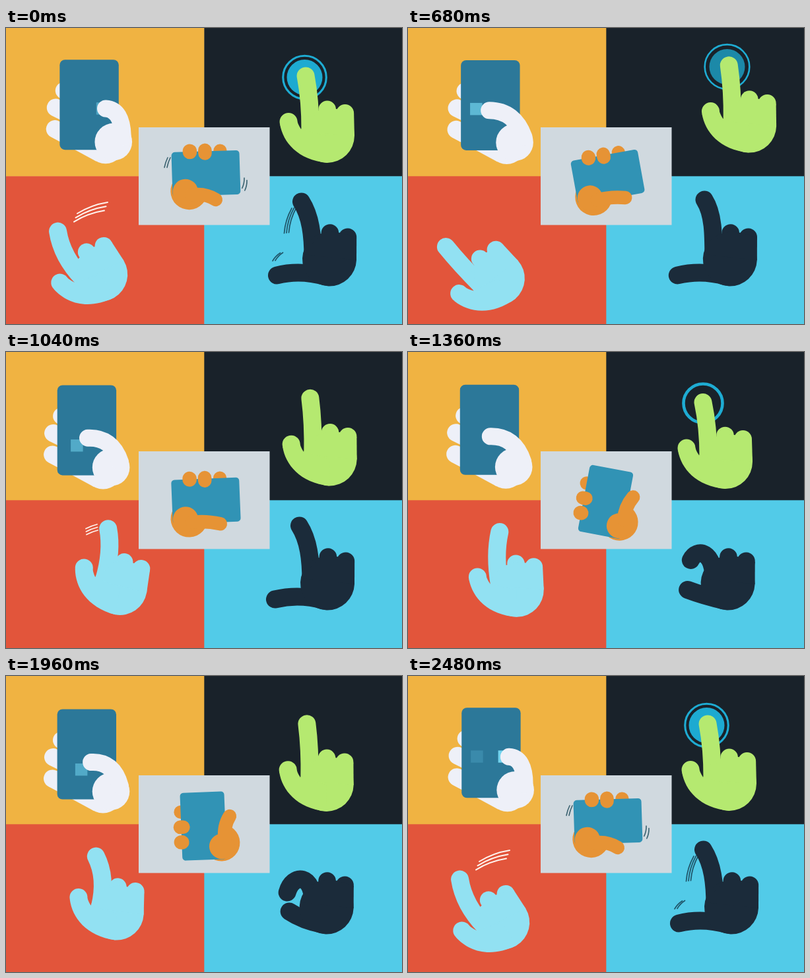
Write an HTML page with a canvas that moves like this. It is 600 by 450 pixels and loops after 2.52 s.

```html
<!DOCTYPE html>
<html lang="en">
<head>
<meta charset="utf-8">
<title>Touch gestures</title>
<style>
  html, body { margin: 0; width: 100%; height: 100%; overflow: hidden; }
  canvas { display: block; width: 600px; height: 450px; }
</style>
</head>
<body>
<canvas id="stage" width="600" height="450"></canvas>
<script>
const ctx = document.getElementById('stage').getContext('2d');
const LOOP = 2520;
const CYCLE = 2480; // the rest of the loop holds the first pose
const SWIPE = 840;

const taps = [
  { time: 520, x: 483.5, y: 59 },
  { time: 1360, x: 447, y: 78 },
  { time: 2360, x: 452.5, y: 75 }
];

const clamp = v => Math.max(0, Math.min(1, v));
const mix = (a, b, k) => a + (b - a) * k;
const rad = deg => deg * Math.PI / 180;
const since = (start, t) => (t - start + CYCLE) % CYCLE;

// Eased step from 0 to 1 between two times.
function ramp(t, from, to) {
  const u = clamp((t - from) / (to - from));
  return u * u * (3 - 2 * u);
}

function paint(color) {
  ctx.fillStyle = ctx.strokeStyle = color;
}

function disc(x, y, r) {
  ctx.beginPath();
  ctx.arc(x, y, r, 0, 2 * Math.PI);
  ctx.fill();
}

function box(x, y, w, h, r) {
  ctx.beginPath();
  ctx.roundRect(x, y, w, h, r);
  ctx.fill();
}

function poly(...pts) {
  ctx.beginPath();
  pts.forEach(p => ctx.lineTo(...p));
  ctx.fill();
}

function limb(width, x, y, ...curve) {
  ctx.lineWidth = width;
  ctx.beginPath();
  ctx.moveTo(x, y);
  if (curve.length === 2) ctx.lineTo(...curve);
  else if (curve.length === 4) ctx.quadraticCurveTo(...curve);
  else ctx.bezierCurveTo(...curve);
  ctx.stroke();
}

// Draws in a moved and turned space.
function within(x, y, turn, body) {
  ctx.save();
  ctx.translate(x, y);
  ctx.rotate(rad(turn));
  body();
  ctx.restore();
}

// Parallel arcs that shoot out, rest and shrink back to their heads.
function speedLines(age, count, [x, y], [dx, dy], [stepX, stepY], bow, width) {
  const from = 1 - clamp(age / 100), to = 1 - clamp((age - 180) / 120);
  if (to <= from) return;
  ctx.save();
  for (let i = 0; i < count; i++) {
    const hx = x + i * stepX, hy = y + i * stepY;
    const len = Math.hypot(dx, dy) * 1.03;
    ctx.setLineDash([len * (to - from), 999]);
    ctx.lineDashOffset = -len * from;
    limb(width, hx, hy, hx + dx / 2 + dy * bow, hy + dy / 2 - dx * bow, hx + dx, hy + dy);
  }
  ctx.restore();
}

// Palm with two folded fingers, centred on the origin.
function palm() {
  disc(0, 0, 41);
  disc(-.5, -40, 13.3);
  disc(26.5, -34.5, 13.5);
  poly([-40, -6], [-15, -37], [-.5, -43], [13, -41], [26.5, -38], [40, -34], [41, 0]);
}

function pointer(x, y, turn, tipX, tipY, bow, color) {
  const c = Math.cos(rad(turn)), s = Math.sin(rad(turn));
  const place = (px, py) => [x + px * c - py * s, y + px * s + py * c];
  paint(color);
  limb(27, tipX, tipY, ...place(-26 - bow, -53), ...place(-26, -8));
  within(x, y, turn, () => {
    palm();
    disc(-59, -21, 13.5);
    ctx.beginPath();
    ctx.moveTo(-72, -17);
    ctx.bezierCurveTo(-67, 10, -45, 37, 0, 41);
    ctx.lineTo(0, 0);
    ctx.lineTo(-40, -10);
    ctx.quadraticCurveTo(-45, -17, -47, -26);
    ctx.fill();
  });
}

// Thumb drags one tile right, then swipes across two more.
function swipePhone(t) {
  const drag = ramp(t, 220, 360);
  const reach = ramp(t, 0, 180) - .47 * drag + .5 * ramp(t, 380, 560) - 1.1 * ramp(t, 690, 800)
    + .07 * ramp(t, 800, SWIPE);
  const sway = Math.sin(Math.PI * (t / SWIPE) ** .6);
  const tiles = [
    [13.5, 65, .7 * ramp(t, 600, 660) - .5 * ramp(t, 690, 800) - .2 * ramp(t, 800, SWIPE)],
    [55, 65, ramp(t, 720, 790) - .5 * ramp(t, 800, SWIPE) + .5 - .5 * ramp(t, 0, 100)
      - .5 * ramp(t, 700, 790)],
    [20 + 17 * drag, 82.5, .55 * (ramp(t, 120, 180) - ramp(t, 370, 440))]
  ];
  tiles[1][2] = t > SWIPE / 2 ? ramp(t, 720, 790) : .5 - .5 * ramp(t, 0, 100);

  within(-4 * sway, 2.5 * sway, 0, () => {
    paint('#eef0f8');
    limb(26, 88, 95, 110, 100);
    limb(27, 75.5, 121, 110, 138);
    limb(27, 74.5, 153.5, 110, 172);
    poly([68, 165], [137, 202.5], [150, 170], [90, 140]);
    disc(151, 177, 29);
    paint('#2c7899');
    box(81.6, 48, 89.4, 137, 8);
    paint('#72d3ee');
    for (const [x, y, alpha] of tiles) {
      ctx.globalAlpha = clamp(alpha);
      ctx.fillRect(82 + x, 48 + y, 18.5, 18.5);
    }
    ctx.globalAlpha = 1;
    paint('#eef0f8');
    disc(163, 173, 28.3);
    const x = 151 - 27 * reach + 4 * sway, y = 122 + 6.5 * sway;
    limb(26, x, y, (x + 177) / 2 + 12, (y + 165) / 2 - 20, 177, 165);
  });
}

function ripple({ time, x, y }, t) {
  const age = since(time, t);
  if (age > 320) return;
  paint('#1eacd3');
  ctx.globalAlpha = 1 - clamp((age - 120) / 160);
  disc(x, y, 27 * clamp(age / 80));
  ctx.globalAlpha = 1;
  ctx.lineWidth = 4.6 - .0125 * age;
  ctx.beginPath();
  ctx.arc(x, y, 29.5 + .027 * age, 0, 2 * Math.PI);
  ctx.stroke();
}

// Glides from tap to tap, leaning back just before each one.
function tapHand(t) {
  taps.forEach(tap => ripple(tap, t));
  const i = taps.findIndex(tap => tap.time > t);
  const next = taps[Math.max(i, 0)], last = taps.at(i < 0 ? -1 : i - 1);
  const span = since(last.time, next.time), age = since(last.time, t);
  const glide = ramp(age, 100, span - 120);
  const x = mix(last.x, next.x, glide), y = mix(last.y, next.y, glide);
  const lean = (.2 * ramp(age, 80, 200) + .75 * ramp(age, span - 320, span - 160))
    * (1 - ramp(age, span - 110, span));
  pointer(x + 34 + 4 * lean, y + 89, 6 * lean, x + 25 * lean, y - 1.5 - 8 * lean, 0, '#b5e970');
}

function swing(t) {
  return -31 - 11 * ramp(t, 200, 780) + 52 * ramp(t, 780, 1000) - 20 * ramp(t, 1040, 1640)
    + 26 * ramp(t, 1640, 2280) - 47 * ramp(t, 2300, 2440);
}

// The whole hand follows the swing; the finger trails it a little.
function flickHand(t) {
  const turn = swing(t), lag = swing(since(70, t)) - turn;
  const x = 165.5 + .72 * turn, y = 361.5 - .3 * turn + .004 * turn * turn;
  const aim = rad(turn + lag - 18.8);
  paint('#fff4ee');
  speedLines(since(2340, t), 3, [108, 282], [46, -17], [-2.5, 6.3], .1, 2);
  speedLines(since(920, t), 3, [138, 262], [-17, 6.5], [.5, 4.5], -.06, 1.8);
  pointer(x, y, turn, x + 92 * Math.sin(aim), y - 92 * Math.cos(aim), 2 * lag, '#92e1f2');
}

function pinchHand(t) {
  const fold = ramp(t, 1160, 1440) - ramp(t, 2260, 2430);
  const settle = ramp(t, 0, 250) - ramp(t, 500, 1040);
  const x = 490 - 3 * ramp(t, 0, 1040) - 3 * fold + 3 * ramp(t, 1640, 2240)
    - 3 * ramp(t, 2260, 2430) + 3 * ramp(t, 2260, 2430);
  const tipX = x + mix(-42.5 + 5 * settle, -59.5, fold);
  const tipY = mix(264 - 4 * settle, 329, fold);

  paint('#20566a');
  speedLines(since(2340, t), 3, [433, 274], [-11.5, 38], [3.5, -.5], -.11, 1.7);
  speedLines(since(2340, t), 2, [404, 354], [11.5, -12], [4, -.5], .12, 1.7);

  paint('#1b2b3a');
  limb(27, tipX, tipY,
    tipX + mix(14, 8, fold), tipY + mix(22, -29, fold),
    x + mix(-25, -18, fold), mix(315, 299, fold),
    x + mix(-25, -21, fold), 350);
  limb(27, x + mix(-79.5, -56.5, fold), mix(376, 358, fold),
    mix(445, 450, fold), mix(367, 372, fold), x - 5, 378);
  within(x, 351.5, 2, palm);
}

function turnPhone(t) {
  const settle = ramp(t, 0, 350), lift = ramp(t, 1160, 1440), drop = ramp(t, 2280, 2440);
  const turn = 88.2 - 8.5 * ramp(t, 0, 700) + 8.5 * ramp(t, 700, 1100) - 96.2 * lift
    + 8 * ramp(t, 1440, 2240) + 88.2 * drop;
  const flat = settle - lift;
  const y = 228 - .022 * turn - 5.2 * (1 - settle + drop);

  paint('#d0d9df');
  ctx.fillRect(201, 151, 198.5, 148.5);
  paint('#3a6270');
  speedLines(since(2340, t), 2, [245, 197], [-5, 15], [4, 0], -.07, 1.6);
  speedLines(since(2340, t), 2, [361, 228], [-3.2, 15.5], [4, 3.5], .12, 1.6);

  within(299 + .045 * turn, y, turn, () => {
    paint('#e69335');
    disc(-33.5, -22.5, 10.2);
    disc(26.5, 26.5, 28);
    paint('#3193b5');
    box(-33.5, -51.5, 67, 103, 5);
    paint('#e69335');
    limb(20.6, -35, .5, -30.5, .5);
    limb(21.4, -34.5, 23.5, -33, 23.5);
    disc(27, 32, 19.2);
    limb(20.5, 40.5 - 4.5 * flat, -13.5 - 7 * flat, 30, 2, 32, 22);
  });
}

function draw(time) {
  const t = time % CYCLE;
  ctx.lineCap = ctx.lineJoin = 'round';
  ['#f0b342', '#19222a', '#e2553b', '#52cbe8'].forEach((color, i) => {
    paint(color);
    ctx.fillRect(i % 2 * 300.5, i < 2 ? 0 : 225.5, 300.5, 225.5);
  });
  swipePhone(time % SWIPE);
  tapHand(t);
  flickHand(t);
  pinchHand(t);
  turnPhone(t);
}

function tick() {
  draw(performance.now() % LOOP);
  requestAnimationFrame(tick);
}
tick();
</script>
</body>
</html>
```
